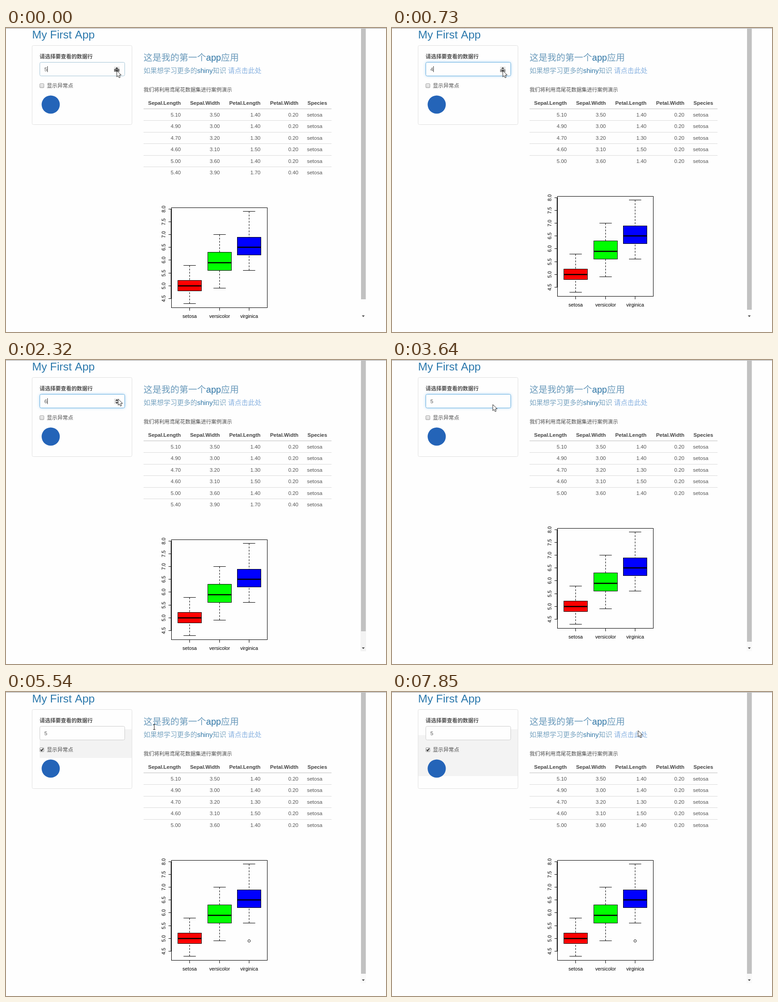
These frames come from a looping animation (837 px wide and 669 px high, 8000 ms). An HTML page with a canvas:

```html
<!DOCTYPE html>
<html lang="zh">
<head>
<meta charset="utf-8">
<title>My First App</title>
<style>
html, body { margin: 0; width: 100%; height: 100%; overflow: hidden; background: #fefefe; }
canvas { display: block; }
</style>
</head>
<body>
<canvas id="stage" width="837" height="669"></canvas>
<script>
const ctx = document.getElementById('stage').getContext('2d');
const LOOP = 8000;
const PAPER = '#fefefe';
const SHADE = '#f3f3f3';
const FACE = '"Liberation Sans", "Noto Sans CJK SC", "Noto Sans CJK", sans-serif';

const IRIS = [
  [5.1, 3.5, 1.4, 0.2], [4.9, 3, 1.4, 0.2], [4.7, 3.2, 1.3, 0.2],
  [4.6, 3.1, 1.5, 0.2], [5, 3.6, 1.4, 0.2], [5.4, 3.9, 1.7, 0.4]
];
const COLUMNS = [['Sepal.Length', 385], ['Sepal.Width', 471], ['Petal.Length', 560.5], ['Petal.Width', 644]];
// low whisker, lower hinge, median, upper hinge, high whisker
const BOXES = [
  ['setosa', '#ff0000', 4.3, 4.8, 5, 5.2, 5.8],
  ['versicolor', '#00ff00', 4.9, 5.6, 5.9, 6.3, 7],
  ['virginica', '#0000ff', 5.6, 6.2, 6.5, 6.9, 7.9]
];

// Each track is a list of [time, value...]; a value holds until the next entry.
const rowTrack = [[0, 6], [300, 5], [740, 4], [2050, 5], [2320, 6], [3350, 5]];
const valueTrack = [[0, 5], [600, 4], [1780, 5], [2190, 6], [3050, 5]];
const caretTrack = [[0, 1], [1350, 0], [1780, 1], [2600, 0], [3050, 1], [3620, 0], [4060, 1], [4460, 0]];
const spinTrack = [[0, 'up'], [160, 'on'], [600, 'down'], [740, 'on'], [1780, 'up'], [1910, 'on'],
  [3050, 'down'], [3200, 'on'], [3620, '']];
const mouseTrack = [
  [0, 244, 94, 'arrow'], [1350, 246, 90, 'arrow'], [1500, 247, 86, 'arrow'],
  [2600, 246, 89, 'arrow'], [2750, 245, 91, 'arrow'],
  [3620, 222, 98, 'arrow'], [3770, 160, 114, 'arrow'], [3920, 98, 128, 'arrow'], [4060, 72, 134, 'arrow'],
  [4180, 72, 134, ''], [4460, 81, 130, 'arrow'],
  [5410, 180, 104, 'arrow'], [5540, 326, 77, 'beam'], [5670, 466, 82, 'arrow'],
  [5800, 460, 88, 'beam'], [5930, 450, 90, 'beam'],
  [6240, 436, 78, 'arrow'], [6380, 405, 78, 'beam'], [6510, 370, 94, 'beam'], [6640, 335, 103, 'beam'],
  [6760, 190, 128, 'arrow'], [6900, 60, 156, 'arrow'], [7040, 4, 171, 'arrow'], [7180, 307, 121, 'arrow'],
  [7310, 372, 116, 'arrow'], [7440, 440, 106, 'arrow'], [7580, 512, 93, 'arrow'],
  [7720, 553, 87, 'arrow'], [7850, 542, 85, 'arrow']
];

function at(track, t) {
  let found = track[0];
  for (const entry of track) if (entry[0] <= t) found = entry;
  return found.slice(1);
}

function text(str, x, y, size, color, align = 'left', weight = 400) {
  ctx.font = `${weight} ${size}px ${FACE}`;
  ctx.fillStyle = color;
  ctx.textAlign = align;
  ctx.fillText(str, x, y);
  return x + ctx.measureText(str).width;
}

// Draws [string, color] runs one after another.
function runs(parts, x, y, size) {
  for (const [str, color] of parts) x = text(str, x, y, size, color, 'left', 300);
}

function rect(x, y, w, h, color) {
  ctx.fillStyle = color;
  ctx.fillRect(x, y, w, h);
}

function line(x1, y1, x2, y2, width = 1) {
  ctx.lineWidth = width;
  ctx.beginPath();
  ctx.moveTo(x1, y1);
  ctx.lineTo(x2, y2);
  ctx.stroke();
}

function panel(x, y, w, h, r, fill, stroke, glow) {
  ctx.beginPath();
  ctx.roundRect(x, y, w, h, r);
  ctx.fillStyle = fill;
  if (glow) {
    ctx.shadowColor = glow;
    ctx.shadowBlur = 6.5;
  }
  ctx.fill();
  ctx.shadowBlur = 0;
  ctx.shadowColor = 'transparent';
  ctx.lineWidth = 1;
  ctx.strokeStyle = stroke;
  ctx.stroke();
}

function shape(points, fill) {
  ctx.beginPath();
  points.forEach(([x, y]) => ctx.lineTo(x, y));
  ctx.closePath();
  ctx.fillStyle = fill;
  ctx.fill();
}

function triangle(x, y, half, h, color) {
  shape([[x - half, y], [x + half, y], [x, y + h]], color);
}

const isFresh = t => t >= 4740 && t < 4880;

function sidebar(t, dx) {
  const right = 277.5 + dx;
  panel(57.5, 38.5, right - 57.5, 174, 3, isFresh(t) ? SHADE : PAPER, '#e0e0e0');
  if (t >= 5410) {
    rect(74, 82, 203, 63, SHADE);
    if (t >= 6900) rect(58, 95, 219, 90, SHADE);
  }
  text('请选择要查看的数据行', 74, 67, 11.7, '#505050', 'left', 700);
  input(t, right - 16);
  checkbox(t);
  text('显示异常点', 90, 131, 11.6, '#4c4c4c');
  ctx.beginPath();
  ctx.arc(98.5, 168.5, 20, 0, Math.PI * 2);
  ctx.fillStyle = '#2464b8';
  ctx.fill();
}

function input(t, right) {
  const focused = t < 4460;
  const glow = focused && t >= 160;
  const border = glow ? '#66afe0' : focused ? '#a3c4d6' : '#ccc';
  panel(74.5, 75.5, right - 74.5, 30, 3, PAPER, border, glow && 'rgba(102,175,233,.6)');
  text(String(at(valueTrack, t)[0]), 84.5, 95, 11.48, '#555');
  if (at(caretTrack, t)[0]) rect(91, 84, 1, 13, '#333');
  const [spin] = at(spinTrack, t);
  if (spin) spinner(Math.floor(right - 23), spin);
}

function spinner(x, mode) {
  rect(x, 85, 12, 12, '#e6e6e6');
  if (mode === 'up') rect(x, 90, 12, 6, '#777');
  if (mode === 'down') rect(x, 91, 12, 6, '#999');
  triangle(x + 6, 90, 3.2, -4, '#444');
  triangle(x + 6, 92.5, 3.2, 4, '#444');
}

function checkbox(t) {
  const g = ctx.createLinearGradient(0, 122, 0, 132);
  g.addColorStop(0, '#eee');
  g.addColorStop(1, '#d8d8d8');
  panel(74.5, 122.5, 9, 9, 1.5, g, '#a2a2a2');
  if (t < 4460) return;
  ctx.strokeStyle = '#333';
  ctx.lineWidth = 2;
  ctx.beginPath();
  ctx.moveTo(76.3, 127);
  ctx.lineTo(78.5, 129.3);
  ctx.lineTo(82, 124.2);
  ctx.stroke();
}

function headings(t, dx) {
  const fresh = isFresh(t);
  const x = 303 + dx;
  const head = fresh ? '#559bc8' : '#6a9abb';
  const sub = fresh ? '#5a9ecb' : '#7aa5c2';
  const latin = '#2f76a6';
  runs([['这是我的第一个', head], ['app', latin], ['应用', head]], x, 72, 19.68);
  runs([['如果想学习更多的', sub], ['shiny', latin], ['知识 ', sub],
    ['请点击此处', fresh ? '#55b4e4' : '#86b0e0']], x, 98.5, 14.76);
  text('我们将利用鸢尾花数据集进行案例演示', x, 140, 11.48, '#4c4c4c');
}

function table(count, dx) {
  const left = Math.floor(303 + dx);
  COLUMNS.forEach(([name, x]) => text(name, x + dx, 169, 11.48, '#444', 'right', 700));
  text('Species', 664 + dx, 169, 11.48, '#444', 'left', 700);
  rect(left, 177, 414, 1.6, '#d4d4d4');
  for (let i = 0; i < count; i++) {
    const y = Math.floor(195 + i * 25.5);
    if (i) rect(left, y - 17, 414, 1, '#dadada');
    IRIS[i].forEach((v, c) => text(v.toFixed(2), COLUMNS[c][1] + dx, y, 11.48, '#555', 'right'));
    text('setosa', 663 + dx, y, 11.48, '#555');
  }
}

function plot(count, dx, outlier) {
  const left = Math.floor(364 + dx);
  const top = Math.round(370 + (count - 5) * 25.4);
  const wide = dx ? 218 : 212;
  const k = wide / 212;
  const yOf = v => top + 3 + (8 - v) * 56.4;
  const snap = v => Math.floor(v) + 0.5;
  ctx.strokeStyle = '#000';
  ctx.lineWidth = 1;
  ctx.strokeRect(left + 0.5, top + 0.5, wide - 1, 220);
  line(left - 0.5, yOf(8), left - 0.5, yOf(4.5));
  for (let v = 4.5; v <= 8; v += 0.5) {
    const y = snap(yOf(v));
    line(left - 6, y, left, y);
    ctx.save();
    ctx.translate(left - 13, y);
    ctx.rotate(-Math.PI / 2);
    text(v.toFixed(1), 0, 0, 10.8, '#000', 'center');
    ctx.restore();
  }
  BOXES.forEach(([name, color, low, q1, mid, q3, high], i) => {
    const x = snap(left + (40.5 + i * 65.5) * k);
    const half = Math.round(26 * k);
    const [yLow, yQ1, yMid, yQ3, yHigh] = [low, q1, mid, q3, high].map(v => snap(yOf(v)));
    ctx.setLineDash([4, 3]);
    line(x, yLow, x, yQ1);
    line(x, yHigh, x, yQ3);
    ctx.setLineDash([]);
    [yLow, yHigh].forEach(y => line(x - 13.5, y, x + 13.5, y));
    rect(x - half, yQ3, half * 2, yQ1 - yQ3, color);
    ctx.strokeRect(x - half, yQ3, half * 2, yQ1 - yQ3);
    line(x - half, yMid, x + half, yMid, 2.6);
    line(x, top + 221, x, top + 227);
    text(name, x, top + 243, 10.7, '#000', 'center');
    if (outlier && i === 2) {
      ctx.lineWidth = 1;
      ctx.beginPath();
      ctx.arc(x, yOf(4.9), 2.7, 0, Math.PI * 2);
      ctx.stroke();
    }
  });
}

function scrollbar(t, count) {
  if (count < 5) return;
  const end = count === 6 ? 597 : 620;
  if (t >= 2050) rect(781, 1, 12, 640, count === 6 ? '#f3f3f3' : '#f9f9f9');
  rect(782, 0, 10.5, end, '#c1c1c1');
  triangle(787, 632.5, 3.2, 3.5, '#444');
}

function mouse(t) {
  const [x, y, kind] = at(mouseTrack, t);
  ctx.save();
  ctx.translate(x, y);
  if (kind === 'arrow') {
    shape([[0, 0], [0, 13.5], [3, 10.8], [5, 15.5], [7.5, 14.5], [5.5, 9.8], [9.8, 9.5]], '#fff');
    ctx.strokeStyle = '#222';
    ctx.lineWidth = 1;
    ctx.stroke();
  } else if (kind === 'beam') {
    ctx.strokeStyle = '#222';
    line(0.5, -5, 0.5, 5);
    [-5.5, 5.5].forEach(v => line(-2, v, 3, v));
  }
  ctx.restore();
}

function draw(t) {
  const [count] = at(rowTrack, t);
  const dx = count < 5 ? 4.5 : 0;
  rect(0, 0, 837, 669, PAPER);
  rect(0, 0, 837, 1, '#9a9a9a');
  text('My First App', 57.5, 23, 24.6, '#2b78ac');
  sidebar(t, Math.floor(dx));
  headings(t, dx);
  table(count, dx);
  plot(count, dx, t >= 4880);
  scrollbar(t, count);
  mouse(t);
}

let start;
function tick(now) {
  if (start === undefined) start = now;
  draw((now - start) % LOOP);
  requestAnimationFrame(tick);
}
draw(0);
requestAnimationFrame(tick);
</script>
</body>
</html>
```
